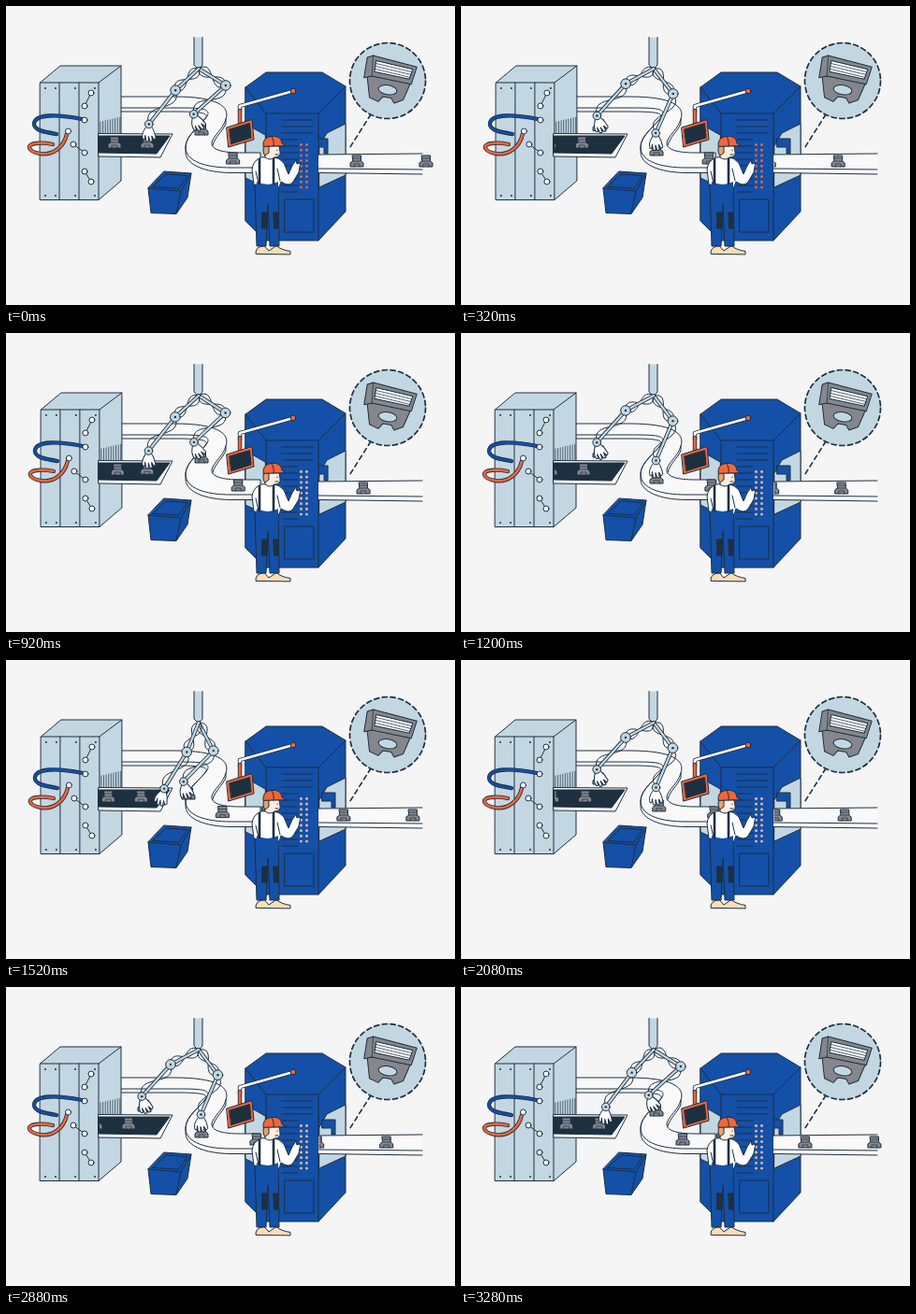
An HTML page that plays this animation: 480 px wide and 320 px high, repeating every 3.32 s.

```html
<!DOCTYPE html>
<html lang="en">
<head>
<meta charset="utf-8">
<title>Assembly line</title>
<style>
  html, body { margin: 0; width: 100%; height: 100%; overflow: hidden; background: #f5f5f5; }
  svg { display: block; width: 480px; height: 320px; }
  .ln { fill: none; stroke: #1c2f42; stroke-width: 1; stroke-linecap: round; stroke-linejoin: round; }
  .pale { fill: #c3d7e2; }
  .white { fill: #fff; }
  .belt { fill: #f9f9f9; }
  .blue { fill: #1450a7; }
  .navy { fill: #1d303f; }
  .orange { fill: #f3663a; }
  .grey { fill: #85878c; }
  .skin { fill: #fbdcb4; }
  .dot { fill: #1c2f42; stroke: none; }
  .thin { stroke-width: .7; }
</style>
</head>
<body>
<svg viewBox="0 0 480 320">
  <defs>
    <clipPath id="leftClip"><path d="M100 100H200V200H100Z"/></clipPath>
    <clipPath id="rightClip"><path d="M334.500 130H470V200H334.500Z"/></clipPath>
    <g id="head" class="ln">
      <path class="grey" d="M-4.500 -6H4.500V0L7 2V6H-7V2L-4.500 0Z"/>
      <path class="thin" d="M-4.500 -3H4.500M-4.500 0H4.500M-3 6V3H3V6"/>
    </g>
    <path id="hand" class="ln white" d="M-3 3C-6 7 -8 11 -6.500 16L-4.500 16.500L-4 12L-3 18.500H-.5V13L1.300 18.500H3.500L3 12.500L5.500 16.500L7.300 15C6.500 10 5 6 3 3Z"/>
  </defs>

  <!-- blue machine -->
  <g class="ln">
    <path class="blue" d="M256 87L278 71H338L363 86V220L334 251H277L256 230Z"/>
    <path d="M256 87L278 115H334L363 86M278 115V251M334 115V251"/>
    <path class="pale" d="M335 150L343 136L363 126V181L335 194Z"/>
    <path class="pale" d="M277 138L256 126V184L277 194Z"/>
    <path id="slats"/>
    <path id="piston" class="blue" d="M330 142H344V158H340V151H330Z"/>
    <path class="blue" d="M326 140H334V160H326Z" style="stroke:none"/>
    <path d="M334 138V162"/>
  </g>
  <g id="lamps"></g>

  <!-- belts and left machine -->
  <g class="ln">
    <path class="belt" d="M334 159L445 158V180L334 178.500Z" style="stroke:none"/>
    <path d="M334 159L445 158M334 174L445 175M334 178.500L445 180"/>
    <path class="belt" d="M123 97H180C225 97 240 107 235 121C232 132 222 138 220 146C219 154 232 157 250 157H272V178.500H240C212 178 193 170 192 157V150C193 138 208 128 214 119C216 114 205 113 180 113H123Z"/>
    <path d="M123 109H180C206 109 220 109 215 118C208 128 192 138 192 151C192 167 215 173 240 173H272M235 121V126C231 135 224 139 221 149"/>
  </g>
  <g id="press" class="ln">
    <path class="pale" d="M36.500 82L58 64H123V187L99 207.500H36.500Z"/>
    <path d="M36.500 82H99L123 64M99 82V207.500M57 82V207.500M78 82V207.500"/>
    <path id="grille" class="thin"/>
  </g>
  <g class="ln">
    <path class="belt" d="M99 136.500L178 137L165 162L99 161Z"/>
    <path class="navy" d="M99 139H175L161 158L99 157Z"/>
  </g>
  <g id="leftHeads" clip-path="url(#leftClip)"></g>

  <!-- bin -->
  <g class="ln">
    <path class="blue" d="M152 195L155 221.500L182 222.500L194 205L198 179L169 177Z"/>
    <path d="M152 195L187 198L198 179M187 198L182 222M157 193L171 180L194 181.500L185 195Z"/>
  </g>

  <!-- close-up -->
  <g class="ln">
    <path d="M390 116L366 154" style="stroke-width:1.600;stroke-dasharray:5 4"/>
    <circle class="pale" cx="408" cy="80" r="40.500" style="stroke-width:1.700;stroke-dasharray:5.200 3.600"/>
    <g transform="translate(411 71) rotate(9)">
      <path class="grey" d="M-25 4L-18 30L-8 33L-4 27H5L9 32L18 27L23 8Z"/>
      <ellipse class="pale" cx="0" cy="19" rx="10" ry="5"/>
      <path class="grey" d="M-27 -12L-21 -15L27 -10L24 9L-19 7L-27 10Z"/>
      <path class="white" d="M-17 -10L23 -7L21 4L-17 2Z"/>
      <path class="thin" d="M-17 -7L22 -4M-17 -4L22 -1M-17 -1L21 2M-21 -15L-19 7"/>
    </g>
  </g>

  <g id="heads"></g>
  <g id="rightHeads" clip-path="url(#rightClip)"></g>

  <!-- screen on its boom -->
  <g class="ln">
    <g id="boom"></g>
    <circle class="orange" cx="307" cy="91" r="2.800"/>
    <path class="orange" d="M236 130L263 121.500L265 143L238 151Z"/>
    <path class="navy" d="M239 132L260.500 125.500L262 141L241 147.500Z"/>
  </g>

  <!-- worker -->
  <g class="ln">
    <path class="skin" d="M267 265Q266 258 276 256.500L281 262L289 256.500Q294 261 304 262.500V265.500Z"/>
    <path class="blue" d="M266 190L268 257H278L280 212L282 257H292L291 190Z"/>
    <path class="navy" d="M274 221H279V238H274ZM286 221H291.500V238H287Z"/>
    <path class="white" d="M273 162Q264 165 263 175L265 191L292 194L294 188Q303 194 307 188L313 178L314 172L315 168L311 169L310 165L306 171L302 180L297 168Q292 162 286 162Z"/>
    <path d="M290 174L293 187M267 177L270 190"/>
    <path class="blue" d="M268 188Q280 194 291 188V200H267Z" style="stroke:none"/>
    <path d="M271 164V190M286 163V190" style="stroke-width:2.600"/>
    <path d="M276 150L277 162Q282 166 287 162Q294 162 293 156L292 150Z" style="fill:#fdeee2"/>
    <path d="M275.500 150Q274 157 277 160L281 157V150Z" style="fill:#e8a06c"/>
    <path class="orange" d="M275 150Q274 141 283 139.500Q294 138 295 147L299 149.500Z"/>
    <path d="M284 140Q287 144 286 150M290 154V154.500M288 159H291"/>
  </g>

  <!-- picker arms -->
  <path class="ln pale" d="M201 33.500V63L206 68L210 63V33.500"/>
  <g id="arms"></g>
</svg>
<script>
const LOOP = 3320, STEP = 40, CYCLE = 840;
const SHOULDER = [206, 67], UPPER = 34, FORE = 46;
const ORANGE = '#f3663a', BLUE = '#1450a7', PALE = '#c3d7e2';
const byId = id => document.getElementById(id);

function add(parent, tag, attrs) {
  const el = document.createElementNS('http://www.w3.org/2000/svg', tag);
  for (const k in attrs) el.setAttribute(k, attrs[k]);
  return parent.appendChild(el);
}
const range = (n, f) => Array.from({ length: n }, (_, i) => f(i));
const makeHeads = (id, n) => range(n, () => add(byId(id), 'use', { href: '#head' }));
const place = (el, x, y, turn = 0) =>
  el.setAttribute('transform', `translate(${x} ${y}) rotate(${turn})`);

// an outlined tube: dark stroke below, coloured stroke on top
function tube(parent, color, width, d = '') {
  const edge = add(parent, 'path', { d, style: `stroke-width:${width}` });
  const core = add(parent, 'path', { d, style: `stroke:${color};stroke-width:${width - 1.7}` });
  return d => [edge, core].forEach(p => p.setAttribute('d', d));
}

// fixed details
byId('slats').setAttribute('d',
  range(12, i => `M295 ${122 + 7 * i}H${i < 3 ? 328 : 312}`).join('') + 'M298 207H329V242H298Z');
byId('grille').setAttribute('d', range(9, i => `M${101 + 2.6 * i} ${124 - .6 * i}V137`).join(''));
tube(byId('boom'), '#fff', 4.4, 'M307 91L250 107V114');
tube(byId('boom'), ORANGE, 4.4, 'M250 112V126');

const press = byId('press');
for (const cx of [42, 53, 74, 95])
  for (const cy of [88, 203]) add(press, 'circle', { cx, cy, r: 1, class: 'dot' });
tube(press, BLUE, 4.3, 'M81 121C56 116 31 115 30 126C30 133 41 135 54 137');
tube(press, ORANGE, 4.3, 'M65 137C62 151 50 160 37 158C23 156 21 148 32 147C40 146 45 147 50 148');
const link = (...ends) => {
  add(press, 'path', { d: 'M' + ends.join('L') });
  for (const [cx, cy] of ends) add(press, 'circle', { cx, cy, r: 3, class: 'white' });
};
link([91, 93], [84, 107]);
link([72, 148], [84, 157]);
link([84, 177], [91, 188]);
link([84, 122]);
link([66.5, 134]);
range(18, i => add(byId('lamps'), 'circle', { cx: 315.5 + i % 2 * 6, cy: 148.5 + (i >> 1) * 5.7, r: 1.4 }));

// Each stop holds its values from one phase to another; moves between stops are eased.
const stop = (from, to, ...values) => ({ from, to, values });
function blend(stops, p) {
  const [first] = stops;
  const all = [...stops, stop(first.from + 1, first.to + 1, ...first.values)];
  const i = all.findIndex(s => p <= s.to), b = all[i], a = all[i - 1];
  if (p >= b.from) return b.values;
  const k = (p - a.to) / (b.from - a.to), e = k * k * (3 - 2 * k);
  return a.values.map((v, n) => v + (b.values[n] - v) * e);
}

// upper arm, forearm and hand angles in degrees from straight down
const ARM_A = [stop(-.05, .05, -47, -38, 0), stop(.42, .48, -62, -42, 20), stop(.68, .68, 0, -26, -30)];
const ARM_B = [stop(-.095, .05, 58, -48, 25), stop(.42, .48, 37, -23, 0), stop(.76, .8, 27, -44, 15)];
// positions of a head handed from one arm to the other, then set on the curve
const CARRY = [stop(0, .05, 151, 146), stop(.42, .48, 148, 127), stop(.64, .81, 195, 143), stop(.905, .999, 209, 132)];
const LOWER = [stop(0, .05, 209, 132), stop(.43, .43, 209, 155)];
const PISTON = [stop(-.1, .08, 0), stop(.35, .82, 8)];

const onCurve = p => [209 + 59 * (p - .43), 155 + 8 * Math.min(1, (p - .43) / .4)];

const swing = ([x, y], length, deg) => {
  const a = deg * Math.PI / 180;
  return [x + length * Math.sin(a), y + length * Math.cos(a)];
};

// a cable winding once across a limb
function wind([x, y], [u, v], s) {
  const dx = u - x, dy = v - y;
  const at = (k, side) => `${x + dx * k + dy * side} ${y + dy * k - dx * side}`;
  return `M${x} ${y}C${at(.3, s)} ${at(.7, -s)} ${u} ${v}`;
}

function makeArm(stops) {
  const g = add(byId('arms'), 'g', { class: 'ln' });
  const hand = add(g, 'use', { href: '#hand' });
  const cable = add(g, 'path', {});
  const limb = tube(g, PALE, 4);
  const joint = r => [add(g, 'circle', { r, class: 'pale' }), add(g, 'circle', { r: 1.2, class: 'dot' })];
  const elbowDots = joint(5.3), wristDots = joint(4.3);
  return p => {
    const [upper, fore, turn] = blend(stops, p);
    const elbow = swing(SHOULDER, UPPER, upper), wrist = swing(elbow, FORE, fore);
    limb(`M${SHOULDER}L${elbow}L${wrist}`);
    cable.setAttribute('d',
      wind(SHOULDER, elbow, .6) + wind(SHOULDER, elbow, -.5) + wind(elbow, wrist, .5));
    elbowDots.forEach(c => place(c, ...elbow));
    wristDots.forEach(c => place(c, ...wrist));
    place(hand, ...wrist, -turn);
  };
}

const left = makeHeads('leftHeads', 2), mid = makeHeads('heads', 3), right = makeHeads('rightHeads', 3);
const arms = [makeArm(ARM_B), makeArm(ARM_A)];

function draw(t) {
  const p = t % CYCLE / CYCLE;
  left.forEach((h, i) => place(h, 81 + 35 * (i + p), 146));
  place(mid[0], ...blend(CARRY, p));
  place(mid[1], ...(p < .43 ? blend(LOWER, p) : onCurve(p)));
  place(mid[2], ...onCurve(1 + Math.min(p, .6)));
  right.forEach((h, i) => {
    const x = 301 + 74 * (i + p);
    place(h, x, 166);
    h.style.display = x < 455 ? '' : 'none';
  });
  arms.forEach(move => move(p));
  place(byId('piston'), ...blend(PISTON, p), 0);
  place(press, t / STEP % 3 === 2 ? .9 : 0, 0);
  byId('lamps').setAttribute('fill', t < 900 ? ORANGE : '#f3bf9c');
}

const start = performance.now();
function tick() {
  const t = (performance.now() - start) % LOOP;
  draw(Math.floor(t / STEP) * STEP);
  requestAnimationFrame(tick);
}
tick();
</script>
</body>
</html>
```
